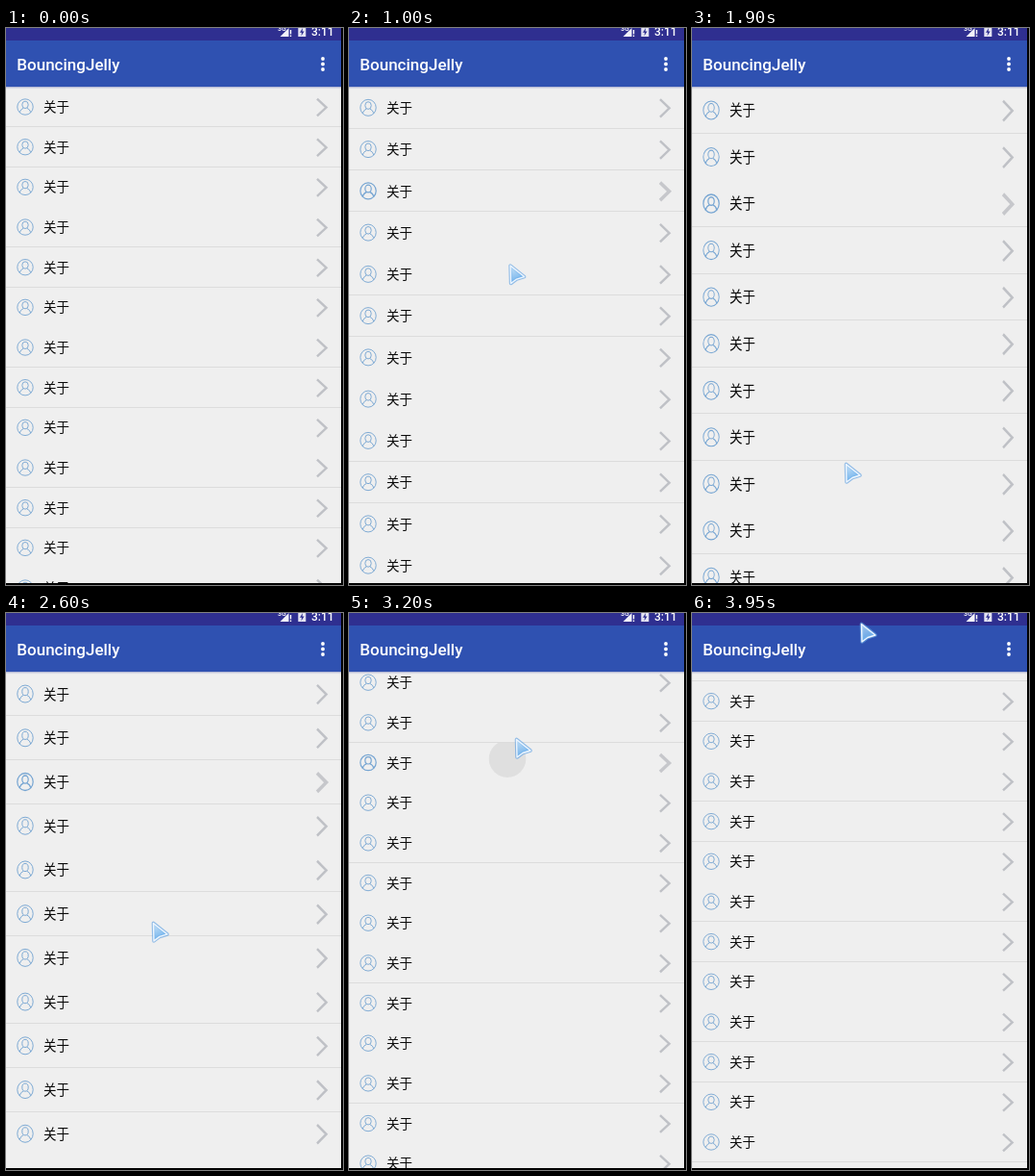
An HTML page with a canvas that plays this animation: 351x579 px, repeating every 4150 ms.

```html
<!DOCTYPE html>
<html lang="zh">
<head>
<meta charset="utf-8">
<title>BouncingJelly</title>
<style>
html, body { margin: 0; width: 100%; height: 100%; overflow: hidden; background: #000; }
canvas { display: block; width: 351px; height: 579px; }
</style>
</head>
<body>
<canvas id="stage"></canvas>
<script>
const W = 351, H = 579, LOOP = 4150, STEP = 50;
const SCREEN_W = 349, SCREEN_H = 577, TOP = 61.2, ROW = 125 / 3;
const MAX_STRETCH = 0.165, PRESSED_ROW = 2;
const canvas = document.getElementById('stage');
const ctx = canvas.getContext('2d');
const dpr = window.devicePixelRatio || 1;
canvas.width = W * dpr;
canvas.height = H * dpr;

const ramp = (t, from, to) => Math.min(1, Math.max(0, (t - from) / (to - from)));
const smooth = u => u * u * (3 - 2 * u);

// The finger enters, pulls the list down, lets it shrink back, then scrolls it.
function poseAt(t) {
  const enter = smooth(ramp(t, 50, 550));
  const pull = ramp(t, 730, 1850);
  const back = ramp(t, 2100, 3200);
  const lift = ramp(t, 3200, 3950);
  const shrink = ramp(t, 2100, 3150) ** 1.2;
  return {
    x: 226 - 57 * enter - 10 * pull + 14 * back - 13.5 * Math.sin(Math.PI * back) + 2 * lift,
    y: 332 - 161 * enter + 281 * (pull + 0.55 * pull * pull * (1 - pull))
      - 322 * back ** 1.14 - 120 * lift,
    stretch: 1 + MAX_STRETCH * (0.9 * pull + 0.1 * smooth(pull) - shrink),
    scroll: 115.4 * ramp(t, 3130, 3950)
  };
}

function rect(x, y, w, h, color) {
  ctx.fillStyle = color;
  ctx.fillRect(x, y, w, h);
}

function text(str, x, y, font, color) {
  ctx.font = font;
  ctx.fillStyle = color;
  ctx.fillText(str, x, y);
}

function poly(points, close = true) {
  ctx.beginPath();
  points.forEach(([x, y]) => ctx.lineTo(x, y));
  if (close) ctx.closePath();
}

function disc(x, y, r, color) {
  ctx.beginPath();
  ctx.arc(x, y, r, 0, Math.PI * 2);
  ctx.fillStyle = color;
  ctx.fill();
}

function drawIcon(y, width) {
  ctx.strokeStyle = '#76a5d2';
  ctx.lineWidth = width;
  ctx.beginPath();
  ctx.arc(20, y, 8.2, 0, Math.PI * 2);
  ctx.stroke();
  ctx.beginPath();
  ctx.ellipse(20, y - 2.2, 3.2, 3.7, 0, 0, Math.PI * 2);
  ctx.stroke();
  ctx.beginPath();
  for (const side of [-1, 1]) {
    ctx.moveTo(20 + side * 5.8, y + 5.8);
    ctx.quadraticCurveTo(20 + side * 5, y + 2.4, 20 + side * 1.8, y + 1.2);
  }
  ctx.stroke();
}

function drawChevron(y, width, color) {
  ctx.strokeStyle = color;
  ctx.lineWidth = width;
  poly([[324, y - 8.4], [333.6, y + 0.5], [324, y + 9.4]], false);
  ctx.stroke();
}

// Hairlines vanish where they fall between two pixels.
function drawDividers(first, height) {
  for (let y = first; y < SCREEN_H; y += height) {
    if (y % 1 > 0.35) rect(0, Math.floor(y), SCREEN_W, 1, '#dcdcdc');
  }
}

function drawRipple(t, top) {
  const fade = ramp(t, 3350, 3250);
  ctx.save();
  ctx.beginPath();
  ctx.rect(0, top, SCREEN_W, ROW);
  ctx.clip();
  disc(165, top + 17, 19.3 + (t - 3200) / 25, `rgba(0,0,0,${0.065 * fade})`);
  ctx.restore();
}

function drawList(t, { stretch, scroll }) {
  const top = TOP - scroll, height = ROW * stretch;
  const pressed = t >= 750 && t < 3400;
  ctx.save();
  ctx.beginPath();
  ctx.rect(0, 61, SCREEN_W, SCREEN_H - 61);
  ctx.clip();

  if (t >= 3150 && t < 3350) drawRipple(t, top + PRESSED_ROW * height);
  drawDividers(top + height, height);

  ctx.translate(0, top);
  ctx.scale(1, stretch);
  for (let i = 0; i < 16; i++) {
    const y = ROW * (i + 0.5), strong = pressed && i === PRESSED_ROW;
    drawIcon(y, strong ? 1.2 : 0.9);
    drawChevron(y, strong ? 3.4 : 2.4, strong ? '#c6c7cb' : '#bfc1c6');
    text('关于', 39, y + 5, '13.5px "Noto Sans CJK SC", "Noto Sans CJK", sans-serif', '#0a0a0a');
  }
  ctx.restore();
}

function drawBars() {
  rect(0, 0, SCREEN_W, 13, '#2f2f90');
  rect(0, 13, SCREEN_W, 48, '#2f51b1');
  const shade = ctx.createLinearGradient(0, 61, 0, 64);
  shade.addColorStop(0, '#a0a6cb');
  shade.addColorStop(1, 'rgba(239,239,239,0)');
  rect(0, 61, SCREEN_W, 3, shade);

  text('BouncingJelly', 11.3, 44, '500 17px Roboto, sans-serif', '#fff');
  for (const y of [32, 37.5, 43]) disc(330, y, 1.9, '#fff');

  text('3G', 283, 2.5, '500 7px Roboto, sans-serif', '#fff');
  poly([[285.5, 9], [294.5, 0], [294.5, 9]]);
  ctx.fillStyle = '#f2f2fa';
  ctx.fill();
  rect(295.8, 2, 1.4, 4.4, '#fff');
  rect(295.8, 7.5, 1.4, 1.5, '#fff');
  rect(304.3, 0, 8, 9, '#e4e4f2');
  poly([[309, 0], [306, 4.8], [308, 4.8], [307.5, 8.3], [310.6, 3.6], [308.6, 3.6]]);
  ctx.fillStyle = '#2f2f90';
  ctx.fill();
  text('3:11', 318, 8, '500 12px Roboto, sans-serif', '#fff');
}

function drawPointer({ x, y }) {
  ctx.save();
  ctx.translate(x, y);
  ctx.lineJoin = 'round';
  poly([[1.5, 1.5], [2, 20], [8, 15.5], [16, 13]]);
  ctx.strokeStyle = 'rgba(95,160,225,0.65)';
  ctx.lineWidth = 3.6;
  ctx.stroke();
  const fill = ctx.createLinearGradient(2, 2, 9, 18);
  fill.addColorStop(0, 'rgba(190,222,248,0.8)');
  fill.addColorStop(1, 'rgba(100,172,236,0.9)');
  ctx.fillStyle = fill;
  ctx.fill();
  ctx.strokeStyle = '#eef6fe';
  ctx.lineWidth = 1.4;
  ctx.stroke();
  ctx.restore();
}

function draw(t) {
  const pose = poseAt(t);
  ctx.setTransform(dpr, 0, 0, dpr, 0, 0);
  rect(0, 0, W, H, '#000');
  rect(0, 0, SCREEN_W, SCREEN_H, '#efefef');
  drawList(t, pose);
  drawBars();
  if (t >= 50) drawPointer(pose);
}

const start = performance.now();
function tick() {
  const t = (performance.now() - start) % LOOP;
  draw(Math.floor(t / STEP) * STEP);
  requestAnimationFrame(tick);
}
tick();
</script>
</body>
</html>
```
